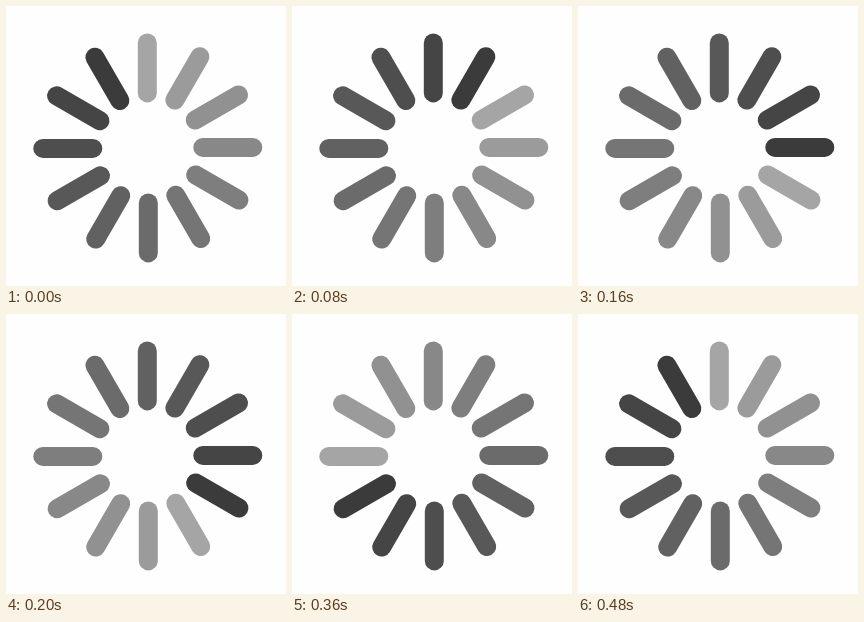
Recreate the animation shown at these times as an HTML page. Size 280 px wide and 280 px high, loop 520 ms.

```html
<!DOCTYPE html>
<html lang="en">
<head>
<meta charset="utf-8">
<title>Spinner</title>
<style>
  html, body { margin: 0; height: 100%; overflow: hidden; background: #fefefe; }
  svg { display: block; width: 100vw; height: 100vh; }
  line { stroke-width: 19; stroke-linecap: round; }
</style>
</head>
<body>
<svg viewBox="0 0 280 280"><g id="spinner" transform="translate(141.8 141.9)"></g></svg>
<script>
  const COUNT = 12, STEP = 40, LOOP = 520;
  const DARK = 59, FADE = 9.6;
  const OFFSET = -0.5; // bars sit slightly off the radial axis
  const spinner = document.getElementById('spinner');

  const bars = Array.from({ length: COUNT }, (_, i) => {
    const bar = document.createElementNS('http://www.w3.org/2000/svg', 'line');
    bar.setAttribute('x1', OFFSET);
    bar.setAttribute('x2', OFFSET);
    bar.setAttribute('y1', -55);
    bar.setAttribute('y2', -105);
    bar.setAttribute('transform', `rotate(${i * 360 / COUNT})`);
    return spinner.appendChild(bar);
  });

  // The darkest bar leads clockwise; the others lighten with their distance behind it.
  function draw(time) {
    const lead = COUNT - 1 + Math.floor(time % LOOP / STEP);
    bars.forEach((bar, i) => {
      const grey = Math.round(DARK + FADE * ((lead - i + COUNT) % COUNT));
      bar.setAttribute('stroke', `rgb(${grey}, ${grey}, ${grey})`);
    });
  }

  const start = performance.now();
  function tick() {
    draw(performance.now() - start);
    requestAnimationFrame(tick);
  }
  tick();
</script>
</body>
</html>
```
